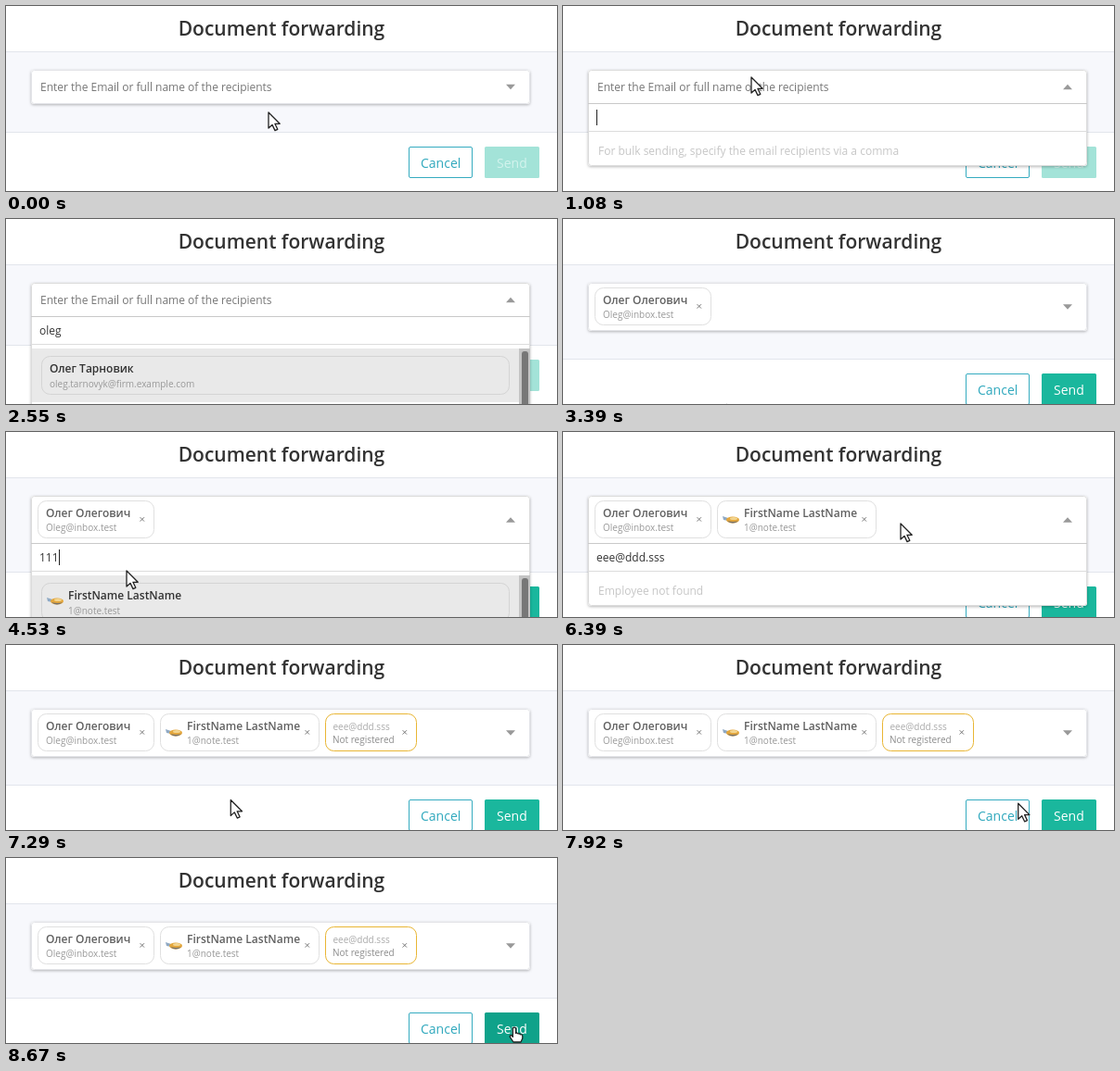
An HTML page for the animation above (9000 ms loop, 594 px wide and 200 px high).

```html
<!DOCTYPE html>
<html lang="en">
<head>
<meta charset="utf-8">
<title>Document forwarding</title>
<style>
html, body { margin: 0; width: 100%; height: 100%; overflow: hidden; background: #fff; }
svg { display: block; font-family: "Open Sans", "Noto Sans", sans-serif; }
.field { filter: drop-shadow(0 1px 1.5px rgba(0, 0, 0, .28)); }
</style>
</head>
<body>
<svg id="stage" width="594" height="200" viewBox="0 0 594 200"></svg>
<script>
const LOOP = 9000;
const stage = document.getElementById('stage');
const ctx = document.createElement('canvas').getContext('2d');

// Moments of the story, in ms
const T = {
  open1: 690, results1: 2160, pick1: 3270,
  open2: 3900, results2: 4410, pick2: 4950,
  open3: 5400, missing: 6030, pick3: 6720, hover: 8070
};
const TYPING = [
  { text: 'oleg', start: 1590, step: 60, from: T.open1, to: T.pick1 },
  { text: '111', start: 4080, step: 90, from: T.open2, to: T.pick2 },
  { text: 'eee@ddd.sss', start: 5670, step: 20, from: T.open3, to: T.pick3 }
];
// Pointer runs: [time, x, y]
const RUNS = [
  [[0, 283, 115], [30, 283, 115], [690, 215, 86], [840, 203, 77], [1260, 203, 77]],
  [[2790, 236, 202], [2910, 228, 208], [3330, 180, 208], [3690, 134, 108],
   [3960, 132, 106], [4440, 130, 150], [4650, 130, 150], [4920, 142, 180], [4980, 142, 180],
   [5370, 362, 92], [5640, 364, 97], [5940, 364, 99], [6600, 364, 99], [7230, 240, 169],
   [7320, 243, 167], [7500, 331, 152], [8130, 546, 178], [8430, 548, 183], [9000, 548, 183]]
];

const rect = (x, y, w, h, fill, more = '') =>
  `<rect x="${x}" y="${y}" width="${w}" height="${h}" fill="${fill}" ${more}/>`;
const outline = (x, y, w, h, color, r) =>
  rect(x + .5, y + .5, w - 1, h - 1, 'none', `stroke="${color}" rx="${r}"`);
const text = (s, x, y, size, fill, more = '') =>
  `<text x="${x}" y="${y}" font-size="${size}" fill="${fill}" ${more}>${s}</text>`;
const bold = 'font-weight="600"';

function avatar(x, y) {
  return `<g transform="translate(${x} ${y})">
    <path d="M0 1L6 3L6 6L1 5Z" fill="#8fa9c4"/>
    <ellipse cx="11" cy="5" rx="7" ry="3.4" fill="#e3a63c"/>
    <ellipse cx="12" cy="3.6" rx="4" ry="1.5" fill="#f3d58f"/>
    <path d="M5 6Q11 11 17 6Q12 8 5 6Z" fill="#75706a"/></g>`;
}

function chip(x, w, border, lines) {
  return outline(x, 74, w, 41, border, 9) + lines +
    `<path d="M${x + w - 15.4} 92.2l4.4 4.4m0-4.4l-4.4 4.4" stroke="#777" fill="none"/>`;
}

function chips(t) {
  let s = '';
  if (t >= T.pick1) s += chip(34, 126, '#e0e0e0',
    text('Олег Олегович', 43, 92, 12, '#606060', bold) +
    text('Oleg@inbox.test', 43, 107, 10, '#999'));
  if (t >= T.pick2) s += chip(166, 172, '#e0e0e0', avatar(172, 90) +
    text('FirstName LastName', 195, 92, 12, '#606060', bold) +
    text('1@note.test', 195, 107, 10, '#999'));
  if (t >= T.pick3) s += chip(344, 99, '#e9b634',
    text('eee@ddd.sss', 352.5, 92, 10, '#aaa') +
    text('Not registered', 352, 106, 10, '#8c8c8c'));
  return s;
}

function buttons(t, dy) {
  const on = t >= T.pick1;
  const fill = !on ? '#a3e3d8' : t >= T.hover ? '#0fa28a' : '#1ab79d';
  return outline(434, 152 + dy, 69, 34, '#35abc0', 1.5) +
    text('Cancel', 447, 175 + dy, 14, '#2fa8bd') +
    rect(516, 152 + dy, 59, 34, fill, 'rx="1.5"') +
    text('Send', 529, 175 + dy, 14, on ? '#fff' : '#d3f3ed');
}

function results(dy, name, mail, icon) {
  const x = icon ? 67 : 47;
  return rect(28, 140 + dy, 526, 58, '#e9e9e9') +
    outline(38, 148 + dy, 505, 42, '#d4d4d4', 9) +
    (icon ? avatar(44, 163 + dy) : '') +
    text(name, x, 166 + dy, 12, '#333', bold) +
    text(mail, x, 181.5 + dy, 10, '#999') +
    rect(553, 140 + dy, 12, 90, '#c4c4c4') +
    rect(556, 143 + dy, 7, 90, '#777', 'rx="3"');
}

function dropdown(t, dy, entry) {
  const count = Math.floor((t - entry.start) / entry.step) + 1;
  const typed = entry.text.slice(0, Math.max(0, count));
  const last = typed
    ? entry.start + (typed.length - 1) * entry.step
    : entry.from;
  let list, tall = false;
  if (entry === TYPING[0] && t >= T.results1) {
    tall = true;
    list = results(dy, 'Олег Тарновик', 'oleg.tarnovyk@firm.example.com');
  } else if (entry === TYPING[1] && t >= T.results2) {
    tall = true;
    list = results(dy, 'FirstName LastName', '1@note.test', true);
  } else {
    const hint = entry === TYPING[2] && t >= T.missing
      ? 'Employee not found'
      : 'For bulk sending, specify the email recipients via a comma';
    list = text(hint, 38, 161 + dy, 12, '#c6c6c6');
  }
  ctx.font = '12px "Open Sans", "Noto Sans", sans-serif';
  const caretX = Math.round(36 + ctx.measureText(typed).width);
  const blink = Math.floor((t - last) / 500) % 2 === 0;
  return `<g class="field">${rect(27, 69, 538, (tall ? 160 : 104) + dy, '#fff', 'rx="3"')}</g>` +
    outline(27, 69, 538, (tall ? 160 : 104) + dy, '#dcdcdc', 3) +
    rect(27, 105 + dy, 538, 1, '#c9c9c9') +
    rect(27, 135 + dy, 538, 1, '#dcdcdc') +
    list + text(typed, 36, 125 + dy, 12, '#333') +
    (blink ? rect(caretX, 112 + dy, 1, 17, '#222') : '');
}

function pointer(t) {
  const run = RUNS.find(r => t >= r[0][0] && t <= r[r.length - 1][0]);
  if (!run) return '';
  const i = Math.max(1, run.findIndex(k => k[0] >= t));
  const [a, b] = [run[i - 1], run[i]];
  const p = (t - a[0]) / (b[0] - a[0]);
  const e = p * p * (3 - 2 * p);
  const x = a[1] + (b[1] - a[1]) * e;
  const y = a[2] + (b[2] - a[2]) * e;
  const shape = t >= T.hover
    ? 'M-1.6 1Q0-.8 1.6 1V6.4Q3 5.4 4 7Q5.6 6.2 6.4 7.8Q8.6 7.2 8.8 9.5V12L7 16H-1L-4.6 10.6Q-5 8.4-3 8.8L-1.6 10.4Z'
    : 'M0 0V17L4 13.4L7 19.6L9.8 18.3L6.9 12.3H12.2Z';
  return `<path d="${shape}" transform="translate(${x.toFixed(2)} ${y.toFixed(2)})" fill="#fff" stroke="#222" stroke-width="1.3" stroke-linejoin="round"/>`;
}

function draw(t) {
  const dy = t >= T.pick1 ? 15 : 0;
  const entry = TYPING.find(k => t >= k.from && t < k.to);
  const mid = 87.5 + dy / 2;
  const tip = entry ? -2.8 : 2.8;
  return rect(0, 0, 594, 200, '#fff') +
    text('Document forwarding', 297, 31.5, 21, '#333', bold + ' text-anchor="middle"') +
    rect(0, 49, 594, 88 + dy, '#f7f8fc') +
    rect(0, 49, 594, 1, '#e2e5ec') +
    rect(0, 136 + dy, 594, 1, '#e2e5ec') +
    buttons(t, dy) +
    (entry
      ? dropdown(t, dy, entry)
      : `<g class="field">${rect(27, 69, 538, 37 + dy, '#fff', 'rx="3"')}</g>` +
        outline(27, 69, 538, 37 + dy, '#e3e4e8', 3)) +
    (dy ? chips(t) : text('Enter the Email or full name of the recipients', 37, 91.5, 12, '#777')) +
    `<path d="M539 ${mid - tip}H549L544 ${mid + tip}Z" fill="#999"/>` +
    pointer(t);
}

let shown = '';
function frame(now) {
  const next = draw(now % LOOP);
  if (next !== shown) stage.innerHTML = shown = next;
  requestAnimationFrame(frame);
}
frame(0);
</script>
</body>
</html>
```
